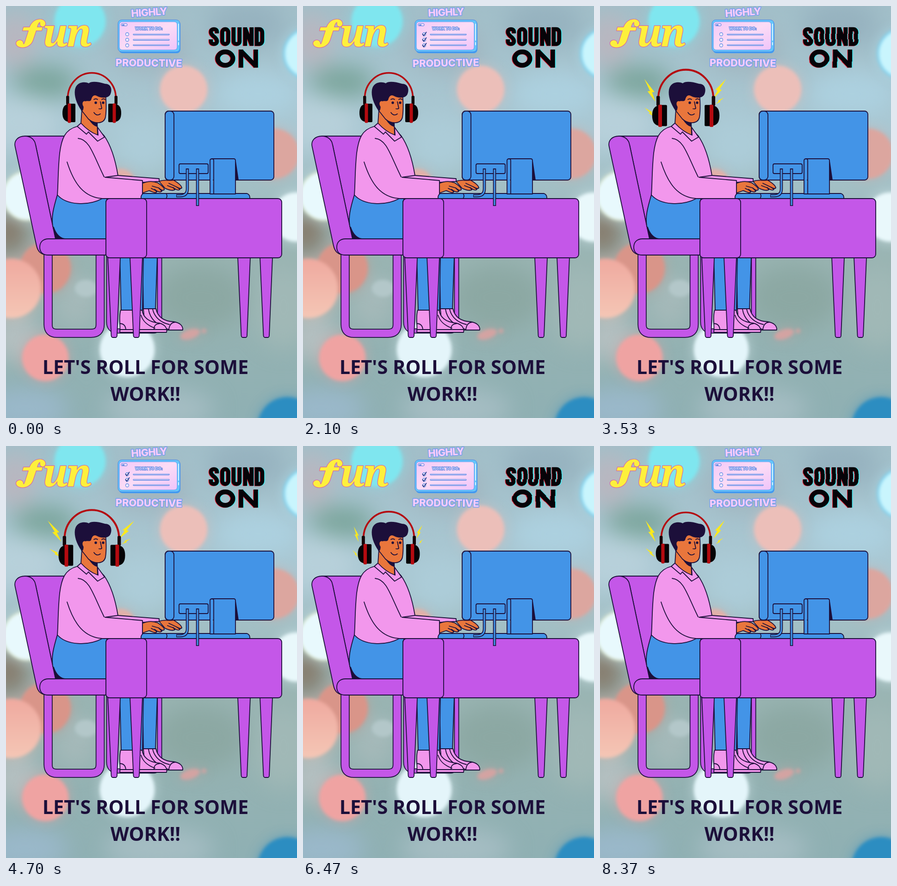
Write an HTML page that moves like this. It is 629 px wide and 890 px high and loops after 8410 ms.

```html
<!DOCTYPE html>
<html lang="en">
<head>
<meta charset="utf-8">
<title>Let's roll for some work</title>
<style>
html, body { margin: 0; width: 100%; height: 100%; overflow: hidden; }
svg { display: block; width: 629px; height: 890px; }
.ink { stroke: #1c0f3a; stroke-width: 1.8; stroke-linejoin: round; stroke-linecap: round; }
.purple { fill: #c457e8; }
.blue { fill: #4394e7; }
.pink { fill: #f297ec; }
.skin { fill: #e9763c; }
.dark { fill: #1c0f3a; }
.line { fill: none; }
.wash { filter: blur(24px); }
.glow { filter: blur(14px); opacity: .5; }
.bokeh { filter: blur(3.5px); }
.slogan { font: 700 41.5px "Open Sans", sans-serif; fill: #1c0f3a; text-anchor: middle; }
.fun { fill: #fdf03c; stroke: #d8699f; stroke-width: 2.4; paint-order: stroke; stroke-linejoin: round; }
.fun text { font: italic 900 82px "Noto Serif", serif; letter-spacing: -4px; }
.bubble { font-family: Inter, sans-serif; font-weight: 800; fill: #fbcdf8; stroke: #6f9cf2;
  stroke-width: 2.8; paint-order: stroke; stroke-linejoin: round; }
.tilt { transform-box: fill-box; transform-origin: center; animation: tilt 420.5ms step-end infinite; }
@keyframes tilt { 0% { transform: none; } 50% { transform: rotate(1.6deg); } }
.check { fill: none; stroke: #35478f; stroke-width: 2; animation: 4205ms step-end infinite; }
.check:nth-child(1) { animation-name: first; }
.check:nth-child(2) { animation-name: second; }
.check:nth-child(3) { animation-name: third; }
@keyframes first { 0%, 74% { opacity: 0; } 5% { opacity: 1; } }
@keyframes second { 0%, 74% { opacity: 0; } 10.5% { opacity: 1; } }
@keyframes third { 0%, 74% { opacity: 0; } 18% { opacity: 1; } }
</style>
</head>
<body>
<svg viewBox="0 0 629 890" xmlns="http://www.w3.org/2000/svg">
<defs>
  <linearGradient id="sky" x1="0" y1="0" x2="0" y2="1">
    <stop offset="0" stop-color="#a2bfc9"/><stop offset=".3" stop-color="#aac8d3"/>
    <stop offset=".62" stop-color="#99b4b2"/><stop offset="1" stop-color="#8fb0b3"/>
  </linearGradient>
  <linearGradient id="card" x1="0" y1="0" x2="1" y2="1">
    <stop offset="0" stop-color="#f3c9f8"/><stop offset=".5" stop-color="#fbdcf6"/><stop offset="1" stop-color="#efc4fa"/>
  </linearGradient>
  <linearGradient id="peach" x1="0" y1="0" x2="0" y2="1">
    <stop offset="0" stop-color="#efa99f"/><stop offset="1" stop-color="#f4c6b5"/>
  </linearGradient>
  <g id="sound" fill="none" stroke-width="8.5">
    <path d="M456 59V56Q456 50 449.500 50Q443 50 443 56Q443 61 449.500 66Q456 71 456 76Q456 82 449.500 82Q443 82 443 76V72"/>
    <rect x="467.500" y="50" width="13" height="32" rx="6.500"/>
    <path d="M492 46V76Q492 82 498.500 82Q505 82 505 76V46M517 86V46M531 86V46M517 48L531 84M542 50H547Q554 50 554 58V74Q554 82 547 82H542Z"/>
    <ellipse cx="474" cy="113.500" rx="16.500" ry="14.500" stroke-width="10"/>
    <path d="M508 133V94M540 133V94M508 97L540 130" stroke-width="9.500"/>
  </g>
  <g id="layers">
    <use href="#sound" x="2" y=".5" stroke="#4fe3ea"/>
    <use href="#sound" x="-1.200" y=".6" stroke="#e8283c"/>
    <use href="#sound" stroke="#060308"/>
  </g>
  <path id="bolt" d="M0 0L-6-28L-1-26L-1-55L7-20L2-22Z" fill="#fbe91c"/>
  <path id="leg" d="M0 543H27L20 712Q19.500 716 17 716H11Q8 716 7.500 712Z"/>
  <path id="frame" d="M91 536V688Q91 707 110 707H184Q203.500 707 203.500 688V536"/>
  <path id="backframe" d="M222 538V682Q222 702 242 702H318Q332 702 332 682V538"/>
  <g id="cup">
    <path d="M134 212Q122 214 122 231Q122 248 134 250Z" fill="#060306"/>
    <rect x="130" y="194" width="6.500" height="19" rx="2" fill="#15060a"/>
    <rect x="134" y="211" width="16" height="40" rx="2" fill="#060306"/>
    <rect x="133.500" y="210.500" width="7" height="42" rx="2" fill="#b40b10"/>
  </g>
  <g id="lights">
    <circle cx="160" cy="33" r="55" fill="#7fe6ef"/>
    <circle cx="384" cy="180" r="51" fill="#ecbfb9"/>
    <circle cx="655" cy="103" r="54" fill="#c9f5fd" stroke="#62c7ee" stroke-width="3"/>
    <circle cx="579" cy="319" r="54" fill="#dca69f"/>
    <circle cx="46" cy="410" r="53" fill="#e8f9fd" stroke="#d3dab0" stroke-width="2"/>
    <circle cx="628" cy="456" r="53" fill="#e9f8fb"/>
    <circle cx="247" cy="385" r="33" fill="#e2b1a9"/>
    <circle cx="85" cy="566" r="55" fill="#d99589"/>
    <circle cx="12" cy="610" r="64" fill="url(#peach)"/>
    <ellipse cx="173" cy="610" rx="24" ry="18" fill="#b3c7c9"/>
    <circle cx="85" cy="760" r="50" fill="#efa3a2"/>
    <circle cx="262" cy="742" r="59" fill="#e4f5fa"/>
    <ellipse cx="398" cy="709" rx="22" ry="10" fill="#d3a3a2" transform="rotate(-18 398 709)"/>
    <circle cx="428" cy="702" r="5" fill="#d3a3a2"/>
    <circle cx="608" cy="909" r="64" fill="#2c8dc1"/>
  </g>
</defs>

<rect width="629" height="890" fill="url(#sky)"/>
<g class="wash">
  <ellipse cx="85" cy="165" rx="70" ry="36" fill="#7ba59c"/>
  <ellipse cx="20" cy="75" rx="45" ry="60" fill="#b9b6bf"/>
  <ellipse cx="310" cy="90" rx="85" ry="55" fill="#a1b5bf"/>
  <ellipse cx="520" cy="40" rx="85" ry="50" fill="#96b2bf"/>
  <ellipse cx="545" cy="190" rx="95" ry="50" fill="#acd0df"/>
  <ellipse cx="30" cy="250" rx="85" ry="60" fill="#b7d0da"/>
  <ellipse cx="295" cy="300" rx="65" ry="60" fill="#acccd8"/>
  <ellipse cx="5" cy="490" rx="45" ry="50" fill="#867b6c"/>
  <ellipse cx="420" cy="630" rx="100" ry="70" fill="#8ca8a3"/>
  <ellipse cx="600" cy="650" rx="65" ry="90" fill="#a0b8b6"/>
  <ellipse cx="150" cy="640" rx="45" ry="55" fill="#a5b9b9"/>
  <ellipse cx="20" cy="715" rx="55" ry="55" fill="#b4bfc0"/>
  <ellipse cx="40" cy="870" rx="95" ry="45" fill="#9ab8ca"/>
  <ellipse cx="330" cy="870" rx="120" ry="45" fill="#a5bdc3"/>
</g>
<use class="glow" href="#lights"/>
<use class="bokeh" href="#lights"/>

<g class="fun">
  <text x="79" y="87">un</text>
  <path d="M84 34C80 27 66 27 58 35Q53 40 51 46H38L36 53H49L41 78C39 84 37 83 37 80C36 72 24 72 22 80C22 93 51 94 58 74L65 53H77L79 46H67C69 37 73 33 74 36C72 42 78 47 83 43Q87 39 84 34Z"/>
</g>

<g class="bubble">
  <g class="tilt"><text font-size="22" letter-spacing="-.8" transform="translate(271 24) rotate(-4)">HIGHLY</text></g>
  <g class="tilt" style="animation-delay:-210ms"><text font-size="22" letter-spacing="-.2" transform="translate(237 132) rotate(-1)">PRODUCTIVE</text></g>
</g>
<rect x="244" y="32" width="133" height="70" rx="8" fill="#3f9df2"/>
<rect x="242" y="30" width="134" height="69" rx="8" fill="#65c6fa" stroke="#4b82e5" stroke-width="1"/>
<rect x="245" y="34" width="125" height="61" rx="6" fill="url(#card)" stroke="#5a98f1"/>
<path d="M373 39V74M373 79V84" fill="none" stroke="#d8f5ff" stroke-width="2" stroke-linecap="round"/>
<rect x="249" y="38" width="13" height="5" rx="2" fill="#f7e1ff" stroke="#4a78db"/>
<rect x="251" y="40" width="5" height="2" fill="#4a78db"/>
<text x="279" y="52" font-family="Inter, sans-serif" font-weight="800" font-size="8.500" letter-spacing=".1" fill="#c9d9ff" stroke="#4a70d7" stroke-width="1.500" paint-order="stroke">WORK TO DO:</text>
<path d="M276 61.500H352M276 73H352M276 84.500H352" stroke="#658ee4" stroke-width="3.400" stroke-linecap="round"/>
<path d="M276 61H352M276 72.500H352M276 84H352" stroke="#e7dcff" stroke-width="1.200" stroke-linecap="round"/>
<g fill="#f6ecff" stroke="#6790e4" stroke-width="1.300">
  <circle cx="262" cy="61" r="3.500"/><circle cx="262" cy="73" r="3.500"/><circle cx="262" cy="85" r="3.500"/>
</g>
<g>
  <path class="check" d="M258 60L261 64L267 56"/>
  <path class="check" d="M258 72L261 76L267 68"/>
  <path class="check" d="M258 84L261 88L267 80"/>
</g>
<g id="glitch"></g>

<!-- chair -->
<g class="ink purple">
  <path d="M41 281H135V503H107L64 300Z"/>
  <path d="M20 305C16 290 27 281 41 281C53 281 62 288 64 300L107 503H92V538C76 538 69 531 66 518Z"/>
</g>
<g fill="none">
  <use href="#frame" stroke="#1c0f3a" stroke-width="19.500"/>
  <use href="#frame" stroke="#c457e8" stroke-width="16"/>
  <use href="#backframe" stroke="#1c0f3a" stroke-width="11"/>
  <use href="#backframe" stroke="#c457e8" stroke-width="7.500"/>
</g>

<!-- legs and shoes -->
<g class="ink">
  <path class="blue" d="M295 540H327L323 655H297Z"/>
  <path class="blue" d="M246 540H297L295 658H249Z"/>
  <path class="pink" d="M297 654H324C328 672 342 681 362 682C376 684 383 691 382 700H340L300 690Z"/>
  <path class="line" d="M308 655C311 676 326 690 352 699M317 655C321 673 335 684 353 688M352 700Q353 684 366 683"/>
  <path class="pink" d="M248 657H294C297 674 310 683 331 685C344 688 349 696 347 705H246C248 690 243 672 248 657Z"/>
  <path class="line" d="M246 699H347M292 668C296 682 306 690 322 696M246 686Q258 686 259 699M320 699Q319 687 332 686"/>
</g>

<!-- body -->
<g class="ink">
  <path class="blue" d="M111 408C102 438 98 455 101 475Q107 503 128 503H218V416Z"/>
  <path class="dark" d="M103 478L108 503H126Q110 499 103 478Z"/>
  <path class="purple" d="M92 503H225V538H90C78 538 73 530 73 521C73 510 80 503 92 503Z"/>
  <path class="skin" d="M331 379C341 374 352 378 362 376C372 382 380 388 380 393C377 396 373 393 369 391L376 396C373 400 366 396 361 392L365 397C359 400 352 397 344 394Z"/>
  <path class="pink" d="M154 260C127 267 120 287 116 318C112 355 113 385 111 408C131 431 178 432 208 416H295V381L331 379V373L242 366C236 330 226 300 212 280L194 261Z"/>
  <path class="line" d="M156 286C181 288 189 323 212 369M242 366L214 370L295 377V416M132 337C148 387 170 413 208 416"/>
  <path class="skin" d="M295 383C309 377 319 379 328 382C337 388 343 393 342 397C338 400 334 396 330 393L337 400C333 404 326 400 321 396L326 402C320 406 314 399 309 399L295 404Z"/>
  <path class="line" d="M316 389L330 393M314 394L322 398M352 383L369 391M349 388L362 393"/>
  <path class="skin" d="M165 208L162 254Q175 268 198 281L197 247Z"/>
  <path class="dark" d="M180 245Q187 252 197 252V260Q188 258 180 245Z"/>
  <path class="pink" d="M162 253L154 260L174 277L178 272L198 292L213 283L198 262L199 279Q179 272 162 253Z"/>
</g>

<!-- head -->
<path class="skin ink" d="M165 188L214 180C217 205 217 227 215 240C212 255 191 256 178 244L163 225Z"/>
<path class="dark" d="M163 226C152 210 147 194 149 181C152 165 168 162 179 167C184 162 198 163 214 168C227 168 230 180 226 190C222 200 206 200 196 194C189 191 186 196 184 203C181 208 176 203 170 207C165 212 170 218 166 226Z"/>
<path class="skin" d="M172 206C164 203 163 216 171 220L178 208Z"/>
<g class="ink line"><path d="M190 202Q194 199 198 202M207 202Q211 199 214 202M204 207L207 221Q205 223 201 222M190 230Q196 239 204 233"/></g>
<circle class="dark" cx="194" cy="209" r="2.700"/><circle class="dark" cx="210" cy="209" r="2.700"/>

<!-- monitor -->
<g class="ink">
  <rect class="blue" x="344" y="227" width="235" height="149" rx="7"/>
  <rect class="blue" x="344" y="227" width="19" height="149" rx="8"/>
  <path class="dark" d="M496 335L502 376H496Z"/>
  <path class="blue" d="M297 405H521Q528 408 527 416H292Q291 408 297 405ZM346 405Q350 410 346 416"/>
  <path class="blue" d="M441 406V334Q441 330 446 330H492Q496 330 496 334V406ZM449 406V334Q449 330 445 330"/>
  <rect class="blue" x="374" y="341" width="63" height="21" rx="3"/>
</g>

<!-- desk -->
<g class="ink purple">
  <use href="#leg" x="220"/><use href="#leg" x="268"/><use href="#leg" x="501"/><use href="#leg" x="549"/>
  <rect x="216" y="416" width="380" height="128" rx="8"/>
  <rect x="216" y="416" width="88" height="128" rx="8"/>
</g>
<g fill="none">
  <path d="M392 351V395Q392 410 376 410H368M414 351V432" stroke="#1c0f3a" stroke-width="6.500"/>
  <path d="M392 353V395Q392 410 376 410H369M414 353V430.500" stroke="#4394e7" stroke-width="3.200"/>
</g>

<g id="bolts"></g>
<g id="phones">
  <path d="M133.500 199A52 54.500 0 0 1 237.500 199" fill="none" stroke="#b40b10" stroke-width="3.600"/>
  <use href="#cup"/>
  <use href="#cup" transform="translate(371 0) scale(-1 1)"/>
</g>

<text class="slogan" x="301.500" y="795">LET'S ROLL FOR SOME</text>
<text class="slogan" x="301.500" y="853">WORK!!</text>
</svg>
<script>
const LOOP = 8410;
const NS = "http://www.w3.org/2000/svg";
const get = id => document.getElementById(id);

// [time, beats]: the pulse runs at slightly under one beat a second
const BEATS = [[0, 0], [100, .05], [1430, 1.42], [2100, 2.02], [3530, 3.5], [4700, 4.6], [6470, 6.25], [8370, 7.93], [LOOP, 8]];
// [phase within a beat, value]
const SWELL = [[0, 0], [.06, 0], [.25, .37], [.42, .92], [.5, 1], [.6, .92], [.93, .15], [1, 0]];
const SPREAD = [[.18, 12], [.25, 16], [.42, 20], [.5, 25], [.6, 32], [.72, 35], [.93, 24]];
const LENGTH = [[.18, .45], [.25, .63], [.42, .91], [.5, 1], [.6, 1], [.93, .93]];
const BOLTS = [
  { x: 120, y: 207, side: -1, size: 1, lean: 0 },
  { x: 245, y: 200, side: 1, size: .92, lean: 7 },
  { x: 119, y: 240, side: -1, size: .56, lean: 22 },
  { x: 250, y: 212, side: 1, size: .42, lean: 26 }
];
// [top, height] of the strips that slip sideways
const STRIPS = [[38, 22], [60, 12], [72, 18], [90, 18], [108, 12], [120, 20]];

function ease(points, x) {
  if (x <= points[0][0]) return points[0][1];
  for (let i = 1; i < points.length; i++) {
    const [x0, y0] = points[i - 1], [x1, y1] = points[i];
    if (x <= x1) return y0 + (y1 - y0) * (x - x0) / (x1 - x0);
  }
  return points[points.length - 1][1];
}

function noise(n) {
  const v = Math.sin(n * 127.1 + 11.7) * 43758.5453;
  return v - Math.floor(v);
}

function add(parent, tag, attrs) {
  const el = document.createElementNS(NS, tag);
  for (const key in attrs) el.setAttribute(key, attrs[key]);
  return parent.appendChild(el);
}

const bolts = BOLTS.map(() => add(get("bolts"), "use", { href: "#bolt" }));
const strips = STRIPS.map(([y, height], i) => {
  const clip = add(document.querySelector("defs"), "clipPath", { id: "strip" + i });
  add(clip, "rect", { x: 430, y, width: 140, height });
  const band = add(get("glitch"), "g", { "clip-path": `url(#strip${i})` });
  return add(band, "use", { href: "#layers" });
});

function drawPhones(t) {
  const phase = ease(BEATS, t) % 1;
  const scale = 1 + .145 * ease(SWELL, phase);
  get("phones").setAttribute("transform", `translate(185.5 192) scale(${scale}) translate(-185.5 -192)`);

  get("bolts").style.display = phase > .18 && phase < .96 ? "" : "none";
  const spread = ease(SPREAD, phase), length = ease(LENGTH, phase);
  BOLTS.forEach(({ x, y, side, size, lean }, i) => {
    const s = size * length;
    bolts[i].setAttribute("transform", `translate(${x} ${y}) rotate(${side * (spread + lean)}) scale(${-side * s} ${s})`);
  });
}

function drawGlitch(t) {
  const tick = Math.floor(t / 70);
  const calm = tick === 0 || noise(tick) < .5;
  strips.forEach((strip, i) => {
    const shift = calm ? 0 : (noise(tick * 7 + i) - .5) * 2;
    strip.setAttribute("x", shift);
  });
}

function draw(now) {
  const t = now % LOOP;
  drawPhones(t);
  drawGlitch(t);
  requestAnimationFrame(draw);
}
draw(0);
</script>
</body>
</html>
```
